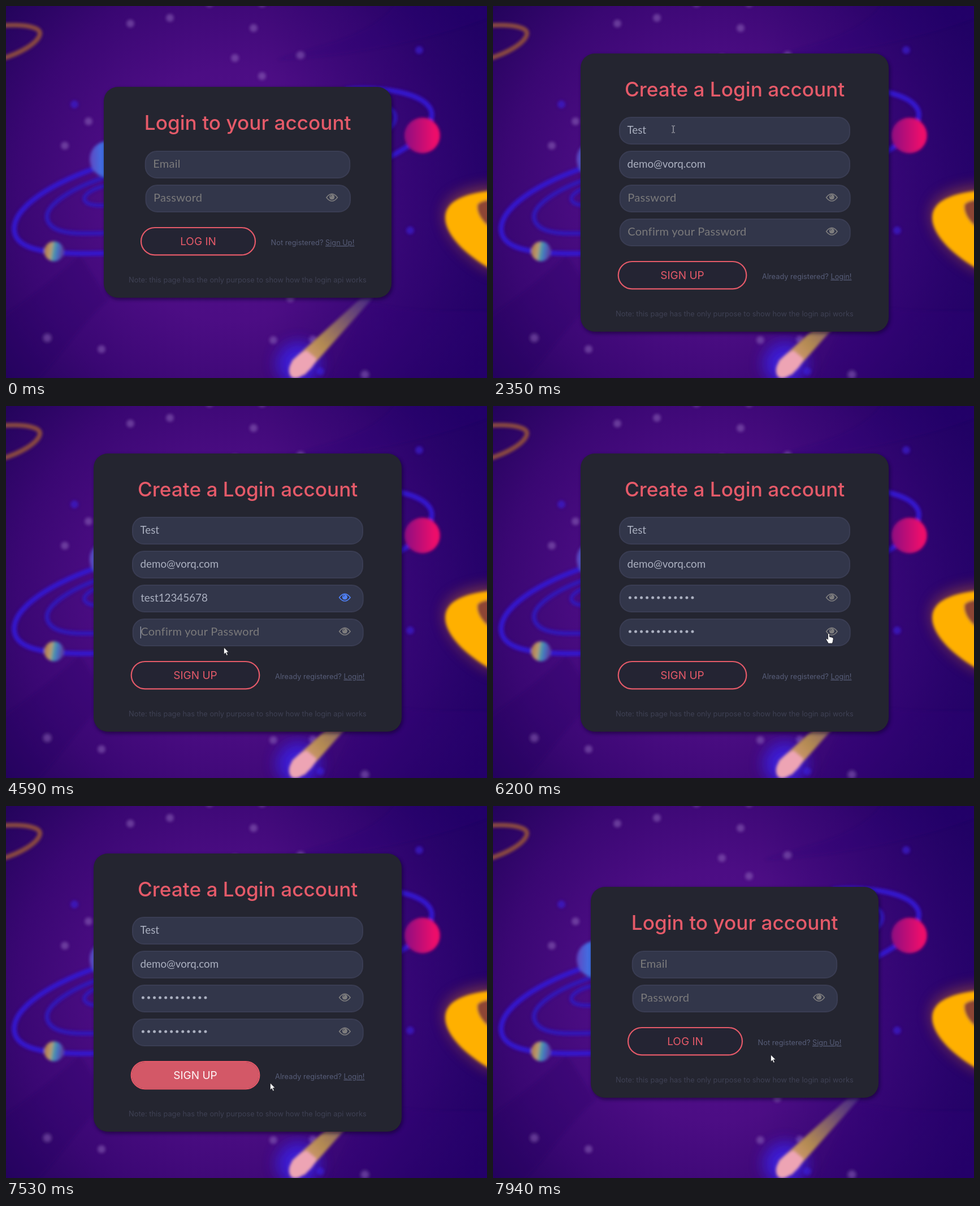
Write an HTML page that moves like this. It is 851 px wide and 658 px high and loops after 7990 ms.

```html
<!DOCTYPE html>
<html lang="en">
<head>
<meta charset="utf-8">
<title>Login form</title>
<style>
  html, body { margin: 0; width: 100%; height: 100%; overflow: hidden; background: #2a0566; }
  svg { display: block; width: 100vw; height: 100vh; }
  text { white-space: pre; }
  .ui { font-family: Inter, "Open Sans", sans-serif; }
  .title { font-size: 35.2px; font-weight: 500; fill: #e55a69; text-anchor: middle; }
  .label { font-size: 19px; fill: #e55a69; text-anchor: middle; }
  .aside { font-size: 12.8px; fill: #575d78; text-anchor: middle; }
  .note { font-size: 12.8px; fill: #3f4154; text-anchor: middle; }
  .link { text-decoration: underline; }
  .hint, .value { font-family: Lato, "Open Sans", sans-serif; }
  .hint { font-size: 20px; letter-spacing: .3px; fill: #7b7a7b; }
  .value { font-size: 18.8px; fill: #abb0c0; }
  .field { fill: #32364a; stroke: #3a3d53; stroke-width: 2; }
  .button { stroke: #e55a69; stroke-width: 2.2; }
  .eye { color: #7d7c7d; }
</style>
</head>
<body>
<svg viewBox="0 0 851 658" preserveAspectRatio="none">
  <defs>
    <radialGradient id="sky" gradientUnits="userSpaceOnUse" cx="400" cy="335" r="530">
      <stop offset="0" stop-color="#520f8e"/>
      <stop offset=".42" stop-color="#4c0d84"/>
      <stop offset=".72" stop-color="#3a0773"/>
      <stop offset="1" stop-color="#22035a"/>
    </radialGradient>
    <linearGradient id="east" x1="0" x2="1">
      <stop offset=".55" stop-color="#20006c" stop-opacity="0"/>
      <stop offset="1" stop-color="#20006c" stop-opacity=".6"/>
    </linearGradient>
    <linearGradient id="pink" x1="0" x2="1">
      <stop offset=".1" stop-color="#98107f"/>
      <stop offset=".85" stop-color="#ee076b"/>
    </linearGradient>
    <linearGradient id="moon" x1="0" x2="1" y2=".15">
      <stop offset=".1" stop-color="#b07a4c"/>
      <stop offset=".4" stop-color="#b99c72"/>
      <stop offset=".55" stop-color="#4f9aa8"/>
      <stop offset=".75" stop-color="#466fc0"/>
      <stop offset="1" stop-color="#5b409c"/>
    </linearGradient>
    <linearGradient id="blue" x1="0" x2="1">
      <stop offset="0" stop-color="#6046c0"/>
      <stop offset=".35" stop-color="#4070e4"/>
    </linearGradient>
    <linearGradient id="tail" gradientUnits="userSpaceOnUse" x1="530" y1="625" x2="645" y2="515">
      <stop offset="0" stop-color="#d39a72"/>
      <stop offset=".25" stop-color="#b38a52"/>
      <stop offset=".6" stop-color="#7d5a6c"/>
      <stop offset="1" stop-color="#56418c" stop-opacity=".6"/>
    </linearGradient>
    <filter id="soft" filterUnits="userSpaceOnUse" x="-60" y="-60" width="980" height="780"><feGaussianBlur stdDeviation="2.5"/></filter>
    <filter id="haze" filterUnits="userSpaceOnUse" x="-60" y="-60" width="980" height="780"><feGaussianBlur stdDeviation="13"/></filter>
    <filter id="shade" x="-10%" y="-10%" width="120%" height="120%"><feGaussianBlur stdDeviation="3"/></filter>
    <g id="eye">
      <path d="M-9.7,0Q-5,-6.3 0,-6.3T9.7,0Q5,6.3 0,6.3T-9.7,0Z" fill="none" stroke="currentColor" stroke-width="1.7"/>
      <circle r="4.6" cy="-.8" fill="currentColor"/>
      <path d="M-2.5,-1.2Q-2.3,-3.4 0,-3.5" fill="none" stroke="#32364a" stroke-width="1"/>
    </g>
  </defs>

  <rect width="851" height="658" fill="url(#sky)"/>
  <rect width="851" height="658" fill="url(#east)"/>
  <g filter="url(#soft)">
    <path d="M700,-20C660,60 545,70 480,95C600,90 760,60 880,10V-20Z" fill="#27037a" opacity=".18"/>
    <path d="M-20,560C70,500 100,470 130,440L180,520C120,570 80,650 20,690H-20Z" fill="#280566" opacity=".22"/>
    <path d="M640,525C720,545 800,540 880,540V690H560Z" fill="#30047a" opacity=".25"/>
    <g id="stars"></g>
    <path d="M-10,35C35,31 62,38 60,50C56,66 25,84 -10,94" fill="none" stroke="#8b4b40" stroke-width="8"/>
    <g fill="none" stroke="#3519cc" stroke-width="9">
      <path d="M185,279C110,299 7,350 15,400C22,440 105,439 190,437"/>
      <path d="M185,300C118,320 63,354 74,380C84,405 130,404 190,401" stroke-width="8" stroke="#3117b8"/>
      <path d="M185,316C150,322 129,338 143,348C152,354 170,353 190,352" stroke-width="7" stroke="#3117b8"/>
      <path d="M600,148C660,141 745,153 753,188C757,218 720,247 670,271"/>
      <path d="M670,178C693,184 695,205 672,221" stroke-width="8" stroke="#3117b8"/>
    </g>
    <circle cx="180" cy="271" r="32" fill="url(#blue)"/>
    <circle cx="85" cy="434" r="17.5" fill="url(#moon)"/>
    <circle cx="736.5" cy="229" r="31.5" fill="url(#pink)"/>
  </g>
  <path d="M870,318C800,323 765,345 780,386C790,420 830,455 870,473Z" fill="#c46a20" opacity=".55" filter="url(#haze)"/>
  <g filter="url(#soft)">
    <path d="M880,325C805,329 768,348 779,387C789,420 830,452 880,478V405C846,391 832,368 834,352Q838,342 880,341Z" fill="#ffb000"/>
    <path d="M880,341Q838,342 834,352C832,368 846,391 880,405Z" fill="#8c4534"/>
  </g>
  <circle cx="517" cy="633" r="38" fill="#3b20ee" opacity=".8" filter="url(#haze)"/>
  <g filter="url(#soft)">
    <path d="M505,628L628,517L650,513L643,523L528,653Z" fill="url(#tail)"/>
    <path d="M501,648C498,630 520,612 532,610L549,624C545,640 528,653 518,657C508,661 502,656 501,648Z" fill="#eda4b4"/>
  </g>

  <g id="login" class="ui"></g>
  <g id="signup" class="ui"></g>
  <rect id="caret" width="1.2" height="21" fill="#a4a8b6"/>
  <g id="cursor">
    <path id="arrow" d="M0,0V12.3L2.8,9.6L4.8,14.2L6.9,13.2L4.9,8.8H8.7Z" fill="#fff" stroke="#15151c" stroke-width=".7"/>
    <path id="beam" d="M-2.8,-6h2.2M.6,-6h2.2M0,-5.5V5.5M-2.8,6h2.2M.6,6h2.2" fill="none" stroke="#c4c3c8" stroke-width="1.1"/>
    <path id="hand" d="M-1.4,1.2Q0,-.8 1.4,1.2V6.2L6,7.2Q8.4,7.8 8.2,10L7.4,14.5L6.4,18H-.6L-4.4,11.5Q-5.4,9 -3.2,9.4L-1.4,11Z" fill="#fff" stroke="#15151c" stroke-width=".8"/>
  </g>
</svg>
<script>
const LOOP = 7990;
const GROW = [7670, 7880];
const $ = id => document.getElementById(id);
const show = (el, on) => el.setAttribute("display", on ? "inline" : "none");
const clamp = v => Math.max(0, Math.min(1, v));
const smooth = v => (v = clamp(v)) * v * (3 - 2 * v);
const within = (t, a, b) => t >= a && t < b;

const dot = (fill, opacity) => ([x, y]) =>
  `<circle cx="${x}" cy="${y}" r="7" fill="${fill}" opacity="${opacity}"/>`;
$("stars").innerHTML = [
  [220, 31], [290, 21], [438, 39], [405, 92], [521, 87], [453, 124], [360, -5], [453, -5], [146, 204],
  [104, 247], [73, 587], [169, 607], [473, 591], [543, 590], [503, 517], [635, 652]
].map(dot("#9a76c4", .46)).join("") +
  [[121, 174], [731, 78], [715, 397], [556, 646]].map(dot("#3a18cc", .72)).join("");

// Markup for both cards
function field(id, hint, x, y, w, eye) {
  const dots = Array.from({ length: 12 }, (_, i) =>
    `<circle cx="${x + 18.7 + 10.05 * i}" cy="${y + 23}" r="2.5" fill="#abb0c0" display="none"/>`).join("");
  return `<rect class="field" x="${x + 1}" y="${y + 1}" width="${w - 2}" height="47" rx="20"/>
    <text class="hint" id="${id}Hint" x="${x + 14.5}" y="${y + 30}">${hint}</text>
    <text class="value" id="${id}Text" x="${x + 14.5}" y="${y + 30}"></text>` +
    (eye ? `<g id="${id}Dots">${dots}</g>
      <g id="${id}Eye" class="eye" transform="translate(${x + w - 33.3},${y + 22.7})"><use href="#eye"/></g>` : "");
}

function card(o) {
  const { id, x, y, w, h } = o, bottom = y + h;
  const box = (name, extra) =>
    `<rect id="${id}${name}" x="${x}" y="${y}" width="${w}" height="${h}" rx="25" ${extra}/>`;
  return box("Shade", 'fill="#0c0628" opacity=".6" transform="translate(2,3)" filter="url(#shade)"') +
    box("Box", 'fill="#242530"') +
    `<g id="${id}Top"><text class="title" x="427.7" y="${y + 75.5}">${o.title}</text>${o.fields}</g>
    <g id="${id}Low">
      <rect class="button" x="${o.bx + 1}" y="${bottom - 124}" width="${o.bw - 2}" height="48.4" rx="24.2" fill="#242433"/>
      <rect id="${id}Fill" x="${o.bx + 2}" y="${bottom - 123}" width="${o.bw - 4}" height="46.4" rx="23.2" fill="#dc5b6a" opacity="0"/>
      <text class="label" id="${id}Label" x="${o.bx + o.bw / 2}" y="${bottom - 93}">${o.label}</text>
      <text class="aside" x="${o.ax}" y="${bottom - 93}">${o.ask} <tspan class="link">${o.link}</tspan></text>
      <text class="note" x="427.4" y="${bottom - 27}">Note: this page has the only purpose to show how the login api works</text>
    </g>`;
}

$("login").innerHTML = card({
  id: "login", x: 173, y: 143, w: 509, h: 373, title: "Login to your account",
  fields: field("user", "Email", 245.7, 256, 363.5) + field("key", "Password", 246.5, 316, 363.5, true),
  bx: 238, bw: 204, label: "LOG IN", ax: 542.5, ask: "Not registered?", link: "Sign Up!"
});
$("signup").innerHTML = card({
  id: "signup", x: 155, y: 84, w: 545, h: 492, title: "Create a Login account",
  fields: field("name", "Name", 223, 196, 409) + field("email", "Email", 223, 256, 409) +
    field("pass", "Password", 223.7, 316, 409, true) +
    field("again", "Confirm your Password", 223.7, 376, 409, true),
  bx: 220.7, bw: 228.6, label: "SIGN UP", ax: 555.3, ask: "Already registered?", link: "Login!"
});

// Typing bursts are [start, end, letters]; focus is [from, to]
const inputs = [
  { id: "name", y: 210, text: "Test", bursts: [[1090, 1340, 4]], focus: [930, 1600] },
  { id: "email", y: 270, text: "demo@vorq.com", bursts: [[1810, 2130, 13]], focus: [1600, 2210] },
  { id: "pass", y: 330, text: "test12345678", bursts: [[2500, 2890, 8], [3040, 3300, 4]],
    focus: [2210, 4000], plain: [4000, 6000] },
  { id: "again", y: 390, text: "test12345678", bursts: [[4620, 5350, 8], [5450, 5560, 2], [5700, 5800, 2]],
    focus: [4420, 6000], plain: [0, 0] }
];

const typed = (t, bursts) => bursts.reduce((sum, [a, b, n]) =>
  sum + (t < a ? 0 : Math.min(n, 1 + Math.floor((t - a) / (b - a) * (n - 1)))), 0);

function drawInput(f, t) {
  const n = typed(t, f.bursts), label = $(f.id + "Text");
  const hidden = f.plain && !within(t, ...f.plain);
  show($(f.id + "Hint"), n === 0);
  label.textContent = hidden ? "" : f.text.slice(0, n);
  if (f.plain) {
    [...$(f.id + "Dots").children].forEach((c, i) => show(c, hidden && i < n));
    $(f.id + "Eye").style.color = hidden ? "" : "#4f80f5";
  }
  if (within(t, ...f.focus) && !within(t, 2350, 2500)) {
    const width = hidden ? n * 10.05 : n ? label.getComputedTextLength() : 0;
    $("caret").setAttribute("x", 237.7 + width);
    $("caret").setAttribute("y", f.y);
    show($("caret"), true);
  }
}

// Pointer stops: time, x, y
const path = [
  [110, 606, -14], [330, 584, 419], [440, 584, 420], [500, 584, 420], [840, 319, 218], [3300, 319, 218],
  [3460, 316, 300], [3820, 580, 370], [3960, 596, 335], [4080, 596, 335], [4380, 384, 402],
  [4450, 384, 402], [4590, 385.5, 427], [5740, 385.5, 427], [5960, 596, 335], [6030, 596, 335],
  [6200, 594, 402], [6480, 597, 403], [6500, 597, 403], [7050, 340, 477], [7370, 340, 477],
  [7530, 467.5, 490], [7670, 482, 478], [7880, 482, 478], [7940, 491.5, 440]
];

function pointerAt(t) {
  const i = path.findIndex(p => p[0] > t);
  if (i < 0) return path[path.length - 1].slice(1);
  const [a, x, y] = path[i - 1], [b, u, v] = path[i], k = smooth((t - a) / (b - a));
  return [x + (u - x) * k, y + (v - y) * k];
}

function pointerKind(x, y, login) {
  const hit = (l, t, r, b) => x > l && x < r && y > t && y < b;
  const rows = login ? [256, 316] : [196, 256, 316, 376];
  const [left, right] = login ? [246, 610] : [223, 633];
  if (login ? hit(565, 410, 618, 428) || hit(238, 391, 442, 441)
            : hit(597, 470, 635, 488) || hit(221, 451, 449, 501)) return "hand";
  const row = rows.findIndex(top => hit(left, top, right, top + 49));
  if (row < 0) return "arrow";
  return row >= rows.length - 2 + (login ? 1 : 0) && x > right - 47 && x < right - 20 ? "hand" : "beam";
}

function draw(t) {
  const login = t < 420 || t >= GROW[1];
  show($("login"), login);
  show($("signup"), !login);
  show($("caret"), false);
  if (!login) {
    inputs.forEach(f => drawInput(f, t));
    const grow = within(t, ...GROW) ? 20.5 : 0;
    for (const part of ["Box", "Shade"]) {
      $("signup" + part).setAttribute("y", 84 - grow);
      $("signup" + part).setAttribute("height", 492 + 2 * grow);
    }
    $("signupTop").setAttribute("transform", `translate(0,${-grow})`);
    $("signupLow").setAttribute("transform", `translate(0,${grow})`);
    const hover = smooth((t - 6920) / 300) * (1 - smooth((t - 7510) / 160));
    const mix = (a, b) => Math.round(a + (b - a) * hover);
    $("signupFill").setAttribute("opacity", hover);
    $("signupLabel").style.fill = `rgb(${mix(229, 255)},${mix(90, 255)},${mix(105, 255)})`;
  }
  show($("cursor"), t >= 110);
  if (t >= 110) {
    const [x, y] = pointerAt(t), kind = pointerKind(x, y, login);
    $("cursor").setAttribute("transform", `translate(${x},${y})`);
    for (const id of ["arrow", "beam", "hand"]) show($(id), id === kind);
  }
}

function tick() {
  draw(performance.now() % LOOP);
  requestAnimationFrame(tick);
}
tick();
</script>
</body>
</html>
```
